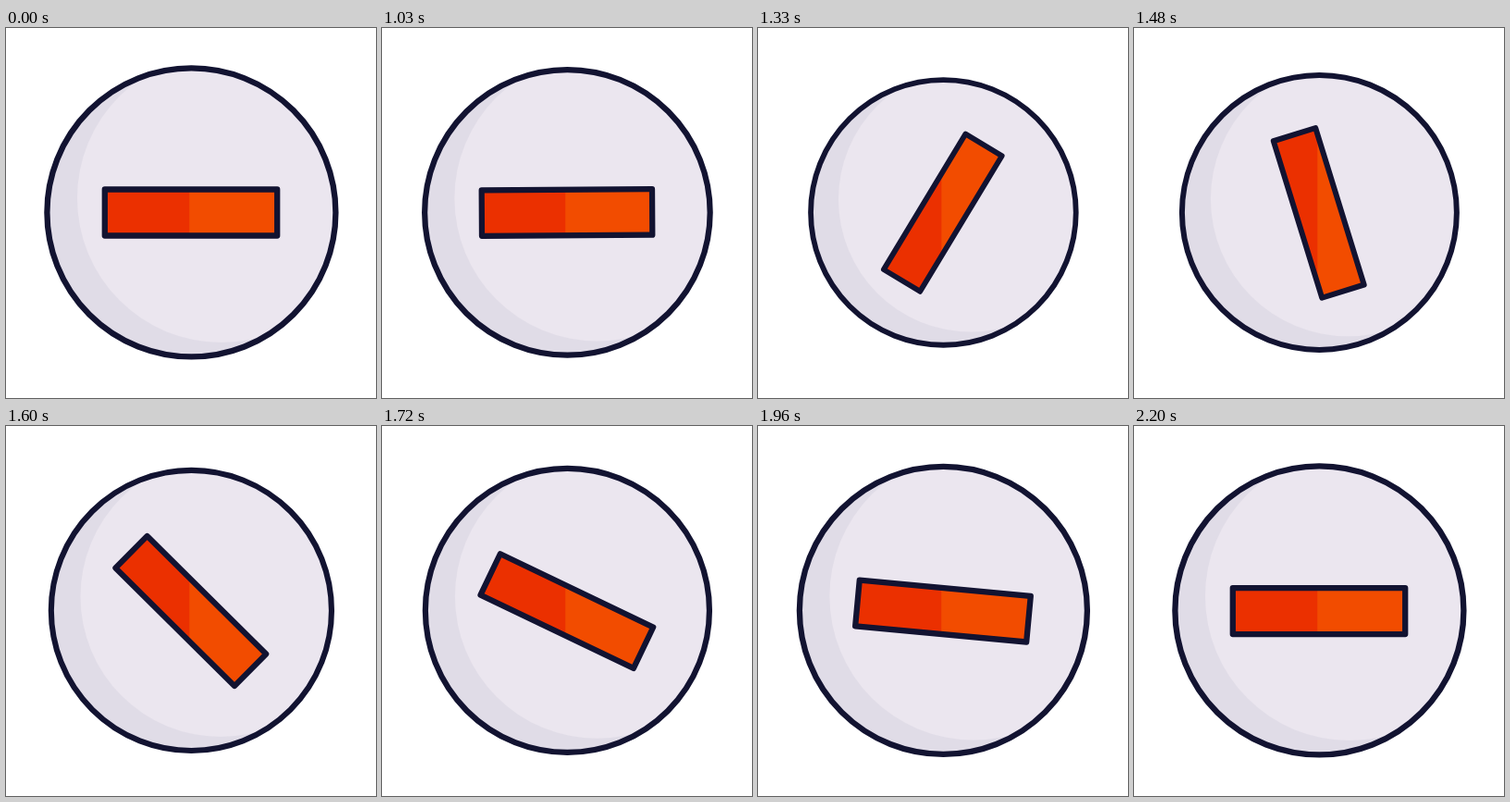
These frames come from a looping animation (400 by 400 pixels, 2230 ms). An HTML page:

```html
<!DOCTYPE html>
<html lang="en">
<head>
<meta charset="utf-8">
<title>Minus button</title>
<style>
  html, body { margin: 0; width: 100%; height: 100%; overflow: hidden; background: #fff; }
  svg { display: block; width: 100vw; height: 100vh; }
  .line { fill: none; stroke: #121331; stroke-width: 6.3; stroke-linejoin: round; }
</style>
</head>
<body>
<svg viewBox="0 0 400 400">
  <defs>
    <clipPath id="disc"><circle cx="200.4" cy="199.4" r="156"/></clipPath>
    <clipPath id="barClip"><rect class="bar" x="-93.2" y="-25.3" width="186.4" height="50"/></clipPath>
  </defs>
  <g id="button">
    <g clip-path="url(#disc)">
      <rect width="400" height="400" fill="#e0dce7"/>
      <circle cx="233" cy="184" r="156" fill="#ebe6ef"/>
    </g>
    <circle class="line" cx="200.4" cy="199.4" r="156"/>
    <g transform="translate(200 199.8)">
      <g clip-path="url(#barClip)">
        <rect x="-120" y="-120" width="240" height="240" fill="#f24c00"/>
        <rect x="-120" y="-120" width="118.2" height="240" fill="#eb3000"/>
      </g>
      <rect class="bar line" x="-93.2" y="-25.3" width="186.4" height="50"/>
    </g>
  </g>
</svg>
<script>
  const LOOP = 2230, START = 1000, STEP = 30, LENGTH = 1200, DIP = 110;
  const button = document.getElementById('button');
  const bars = document.querySelectorAll('.bar');

  // Cubic bezier easing with handles (x1, 0) and (x2, 1)
  const bezier = (x1, x2) => p => {
    if (p <= 0) return 0;
    if (p >= 1) return 1;
    let lo = 0, hi = 1;
    for (let i = 0; i < 24; i++) {
      const s = (lo + hi) / 2, r = 1 - s;
      const x = 3 * r * r * s * x1 + 3 * r * s * s * x2 + s * s * s;
      if (x < p) lo = s; else hi = s;
    }
    return lo * lo * (3 - 2 * lo);
  };
  const spin = bezier(0.33, 0.275);
  const press = bezier(0.5, 0.67);
  const release = bezier(0.33, 0.22);

  function draw(time) {
    const t = Math.max(0, Math.floor((time % LOOP - START) / STEP) * STEP);
    const angle = -180 * spin(t / LENGTH);
    const depth = t < DIP ? press(t / DIP) : 1 - release((t - DIP) / (LENGTH - DIP));
    const scale = 1 - 0.1 * depth;
    button.setAttribute('transform', `translate(200.3 199.6) scale(${scale}) translate(-200.3 -199.6)`);
    bars.forEach(bar => bar.setAttribute('transform', `rotate(${angle})`));
  }

  const begin = performance.now();
  function tick() {
    draw(performance.now() - begin);
    requestAnimationFrame(tick);
  }
  draw(0);
  requestAnimationFrame(tick);
</script>
</body>
</html>
```
